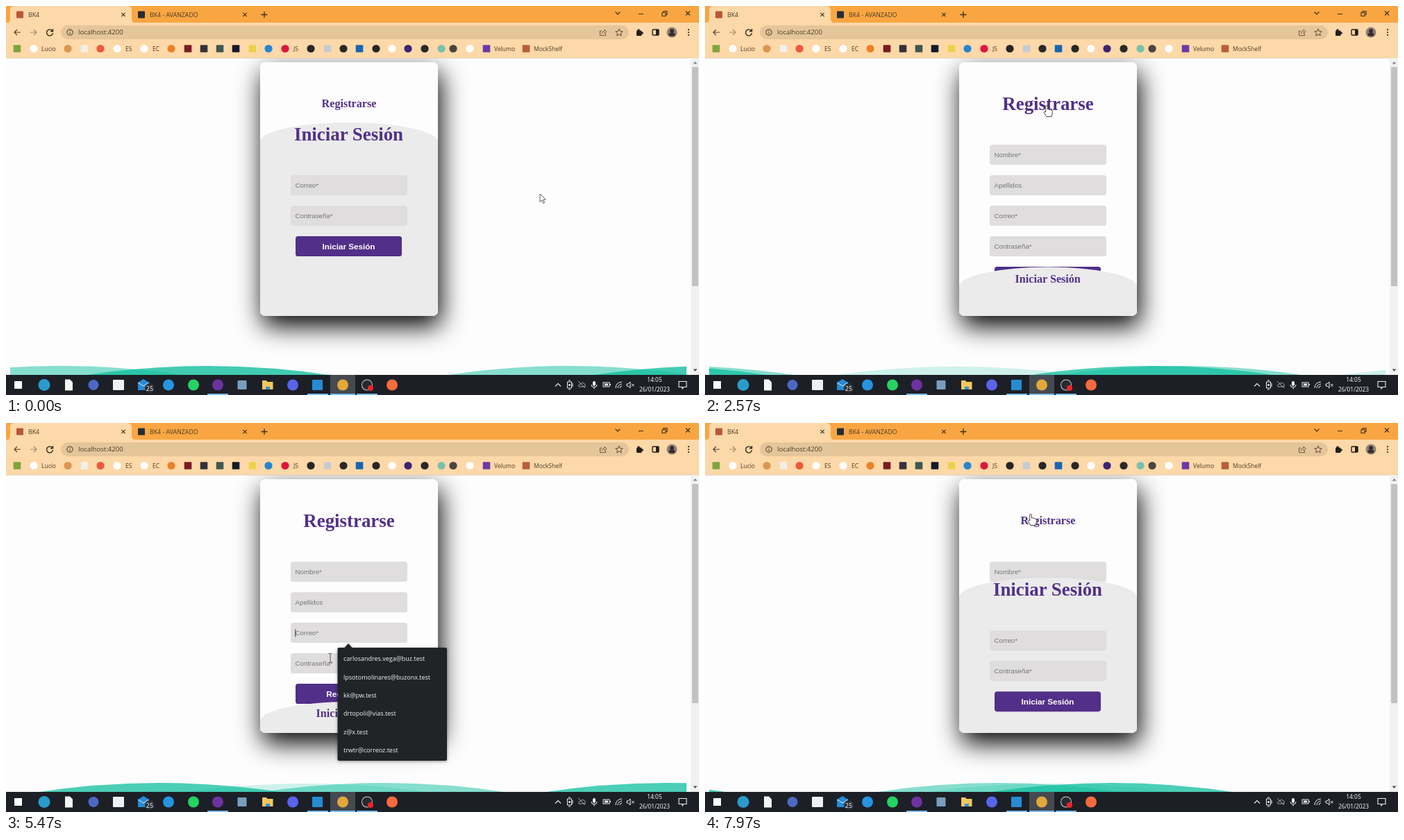
Write an HTML page that moves like this. It is 998 px wide and 561 px high and loops after 8 s.

```html
<!DOCTYPE html>
<html lang="es">
<head>
<meta charset="utf-8">
<title>Registro</title>
<style>
  html, body { margin: 0; width: 100%; height: 100%; overflow: hidden; background: #fdfdfd; }
  #stage { position: relative; width: 998px; height: 561px; overflow: hidden; }
  svg { position: absolute; left: 0; top: 0; font-family: "Open Sans", sans-serif; }
  .card { position: absolute; left: 365.5px; top: 81px; width: 256px; height: 365.5px; border-radius: 7.3px;
          background: #fefdfd; overflow: hidden; }
  .shadow { overflow: visible; box-shadow: 3.7px 14.6px 36.5px #000; }
  .login { position: absolute; left: 0; top: 87px; width: 256px; height: 336px; background: #ebebeb;
           border-radius: 50% / 8.33%; }
  .label { position: absolute; left: 0; width: 256px; height: 32px; text-align: center; color: #52308a;
           font: bold 26.9px/32px "Liberation Serif", serif; }
  .field, .button { position: absolute; box-sizing: border-box; height: 29px; border-radius: 3.6px;
                    font-family: "Liberation Sans", sans-serif; line-height: 29px; }
  .field { left: 44px; width: 168.5px; padding-left: 7px; background: #dfdddd; color: #777; font-size: 9.74px; }
  .button { left: 51.5px; width: 153px; background: #522f88; color: #fff; text-align: center;
            font-weight: bold; font-size: 11.7px; }
</style>
</head>
<body>
<div id="stage">
  <svg id="waves" width="998" height="561"></svg>
  <div class="card shadow"></div>
  <div class="card">
    <div class="label" id="signupLabel" style="top:44px">Registrarse</div>
    <div class="field" style="top:119px">Nombre*</div>
    <div class="field" style="top:163px">Apellidos</div>
    <div class="field" style="top:207px">Correo*</div>
    <div class="field" style="top:251px">Contraseña*</div>
    <div class="button" style="top:294.5px">Registrarse</div>
    <div class="login" id="login">
      <div class="label" id="loginLabel" style="top:1px">Iniciar Sesión</div>
      <div class="field" style="top:76px">Correo*</div>
      <div class="field" style="top:120px">Contraseña*</div>
      <div class="button" style="top:163.5px">Iniciar Sesión</div>
    </div>
  </div>
  <svg id="overlay" width="998" height="561"></svg>
</div>
<script>
const $ = id => document.getElementById(id);
const LOOP = 8000, OPEN = 1955, CLOSE = 7440;

// Static drawing helpers
const text = (s, x, y, size = 8.6, fill = '#4b3a28', extra = '') =>
  `<text x="${x}" y="${y}" font-size="${size}" fill="${fill}" ${extra}>${s}</text>`;
const rect = (x, y, w, h, fill, r = 0, extra = '') =>
  `<rect x="${x}" y="${y}" width="${w}" height="${h}" rx="${r}" fill="${fill}" ${extra}/>`;
const dot = (x, y, r, fill) => `<circle cx="${x}" cy="${y}" r="${r}" fill="${fill}"/>`;
const line = (d, color = '#3b2d1c', width = 1.1, fill = 'none') =>
  `<path d="${d}" fill="${fill}" stroke="${color}" stroke-width="${width}"/>`;
const cross = (x, y, r) => line(`M${x - r} ${y - r}l${2 * r} ${2 * r}m0 ${-2 * r}l${-2 * r} ${2 * r}`);

function browser() {
  let s = rect(0, 0, 998, 26, '#f9a642') + rect(0, 24, 998, 51, '#fdd8a8') + rect(0, 74.5, 998, 1, '#e3cdae');
  s += `<path d="M0 25Q6 25 6 18V6Q6 0 12 0H175Q181 0 181 6V18Q181 25 187 25Z" fill="#fdd8a8"/>`;
  s += rect(15, 7.5, 10, 10, '#b9563a', 1) + text('BK4', 32, 15.5, 8.8) + cross(169, 12.5, 2.7);
  s += rect(190, 7.5, 10, 10, '#222d38', 1) + text('BK4 - AVANZADO', 207, 15.5, 8.8) + cross(344, 12.5, 2.7);
  s += line('M367.5 12.5h9M372 8v9', '#3b2d1c', 1.3);
  s += line('M877.5 8.5l3.5 3.5 3.5-3.5M911 11.5h7M945 9.5h5v5h-5zM947 9.5v-2h5v5h-2') + cross(982, 10.5, 3);
  s += line('M21 38h-9m4-4l-4 4 4 4', '#514331', 1.2) + line('M35 38h9m-4-4l4 4-4 4', '#a28a6d', 1.2);
  s += line('M66.5 35.5A4.5 4.5 0 1 0 67.5 39M67.5 33v3.5H64', '#2f261b', 1.4);
  s += rect(79, 28, 818, 20, '#e5c59a', 10);
  s += line('M96.2 38A4.2 4.2 0 1 0 87.8 38A4.2 4.2 0 1 0 96.2 38M92 37.5v3M92 35v1.2', '#5b4a35');
  s += text('localhost:4200', 104, 41.3, 9.6, '#4a3d2d');
  s += line('M858 36h-2.500v6.500h8v-2.500M858 40q1-4 4-4v-2l3 3-3 3v-2', '#6b5842', 1);
  s += line('M883 33l1.500 3.500 3.700.3-2.800 2.400.9 3.700-3.300-2-3.300 2 .9-3.700-2.800-2.400 3.700-.3z', '#5b4a35', 1);
  s += rect(908, 35.5, 7.5, 7.5, '#221d17', 1) + dot(911, 35, 1.8, '#221d17') + dot(916, 39, 1.8, '#221d17');
  s += rect(931, 34, 9, 8, 'none', 1, 'stroke="#221d17" stroke-width="1.4"') + rect(936, 34, 4, 8, '#221d17');
  s += dot(959, 38, 7.5, '#8f8076') + dot(959, 36, 3, '#352c2b') + rect(954.5, 38.5, 9, 5, '#352c2b', 3);
  for (const y of [34.2, 38, 41.8]) s += dot(983, y, 1.1, '#2f261b');

  const circles = [[40, '#fff'], [89, '#db9650'], [136, '#ee583e'], [160, '#fff'], [199, '#fff'], [238, '#eb8128'],
    [378, '#2685d0'], [402, '#dc173f'], [439, '#262626'], [486, '#282828'], [533, '#262626'], [556, '#fff'],
    [579, '#3c2376'], [603, '#282828'], [627, '#78c1ad'], [644, '#4a4540'], [668, '#fff']];
  const squares = [[16, '#7da53d'], [113, '#f2efe9'], [262, '#791b24'], [285, '#35313c'], [308, '#3f5751'],
    [331, '#131a2b'], [355, '#ead34b'], [463, '#c7cbd3'], [509, '#1765b5'], [692, '#6c3aa7'], [749, '#b65f3c']];
  for (const [x, c] of circles) s += dot(x, 61.5, 5.6, c);
  for (const [x, c] of squares) s += rect(x - 5.3, 56.2, 10.6, 10.6, c, 1);
  for (const [label, x] of [['Lucio', 51], ['ES', 172], ['EC', 211], ['JS', 414], ['Velumo', 703], ['MockShelf', 760]])
    s += text(label, x, 64.5, 8.5);

  s += rect(986, 75, 12, 457, '#f1f1f1') + rect(988, 88, 9, 316, '#c1c1c1');
  s += `<path d="M989.500 83.500l3-3.500 3 3.500z" fill="#888"/><path d="M989.500 523.500l3 3.500 3-3.500z" fill="#555"/>`;
  return s;
}

function taskbar() {
  let s = rect(0, 532, 998, 29, '#1d1f26') + rect(467, 532, 36, 29, '#454950');
  s += rect(12, 541, 11, 11, '#fff') + dot(55, 546.5, 8.5, '#2a9bcb');
  s += `<path d="M85 538.500h7l4 4v12H85z" fill="#f6f6f6"/>`;
  s += dot(126, 546.5, 7.5, '#4c68c4') + rect(154, 539, 16, 15, '#eef1f3', 1);
  s += `<path d="M190 543l8-5 8 5v11h-16z" fill="#278bd5"/>` + line('M190 543l8 5 8-5', '#d8edfb', 1);
  s += dot(207, 551, 7, '#2b3036') + text('25', 207, 554.5, 9, '#fff', 'text-anchor="middle"');
  for (const [x, c] of [[234, '#2794df'], [270, '#25d263'], [305, '#6d32a0'], [413, '#5865ec'], [556, '#f56b3e']])
    s += dot(x, 546.5, 8, c);
  s += rect(333.5, 540, 13, 13, '#789ebd', 1);
  s += `<path d="M369 540h6l1.500 2h8v11H369z" fill="#f3c75c"/>` + rect(374, 549, 6, 4, '#3d91d0');
  s += rect(441, 539, 15, 15, '#278bd3', 1) + dot(485, 546.5, 8, '#e2a83a');
  s += dot(520, 546.5, 8, '#d4d4d6') + dot(520, 546.5, 7, '#292a30') + dot(525, 551, 4, '#ee2424');
  for (const [x, w] of [[290, 30], [434, 30], [467, 36], [505, 30]]) s += rect(x, 559, w, 2, '#76b9ed');
  const white = '#f1f1f1';
  s += line('M791 548.500l4-4 4 4', white);
  s += line('M808.500 542h6v9h-6zM816 544v5M810 540h3M810 553h3', white, 1) + dot(811.5, 546.5, 1.5, white);
  s += line('M825 549q-1-4 3-4 1-3 4-1 3 1 2 5zM824 541l10 10', '#aaa', 1);
  s += rect(845, 541, 4, 7, white, 2) + line('M843 546q0 4 4 4t4-4M847 550v2.500', white, 1);
  s += rect(860, 543, 9, 6, 'none', 0, `stroke="${white}"`) + rect(862, 544.5, 5, 3, white) + rect(869.5, 545, 1.5, 2, white);
  s += line('M878 551q0-8 9-9M881 551q0-5 6-6M884 551q0-3 3-3', white, 1);
  s += line('M894 545h2l3-3v9l-3-3h-2zM901 545l3.500 3.500m0-3.500l-3.500 3.500', white, 1);
  s += text('14:05', 934, 542.3, 8.4, '#fff', 'text-anchor="middle"');
  s += text('26/01/2023', 934, 555.5, 8.3, '#fff', 'text-anchor="middle"');
  return s + line('M969 541.500h11v8h-4l-2 2.500v-2.500h-5z', white);
}

function suggestions() {
  const mails = ['carlosandres.vega@buz.test', 'lpsotomolinares@buzonx.test', 'kk@pw.test',
    'drtopoli@vias.test', 'z@x.test', 'trwtr@correoz.test'];
  return `<g id="popup" style="filter:drop-shadow(0 1px 2px #0006)">` +
    `<path d="M487 324.500l6-6.500 6 6.500z" fill="#202427"/>` + rect(477.5, 324, 157.5, 163, '#202427', 2) +
    mails.map((m, i) => text(m, 486, 343.3 + i * 26.3, 9, '#f4f4f4')).join('') + '</g>';
}

const cursors = {
  arrow: line('M0 0V11.500l2.700-2.500 2 4.500 1.900-.9-2-4.300H8.200z', '#333', .8, '#fff'),
  hand: line('M-1.300 9V1.200Q0-.8 1.300 1.200V6Q3 5 4 6.500 5.500 5.700 6.300 7.200 8.300 6.700 8.300 9V12L7 16.500H0L-4 10.500Q-3.700 8.200-1.300 10z',
    '#333', .9, '#fff'),
  beam: line('M-2.500-6.500H-.7L0-5.800.7-6.500H2.500M0-5.800V5.800M-2.500 6.500H-.7L0 5.800.7 6.500H2.500', '#555', 1)
};

$('overlay').innerHTML = '<path id="caret" stroke="#222" stroke-width=".9"/>' + suggestions() + browser() + taskbar() +
  '<g id="cursor">' + Object.entries(cursors).map(([k, d]) => `<g id="${k}">${d}</g>`).join('') + '</g>';

// start position, px per second, opacity, crest height
const waveLayers = [[300, 24.3, .2, 520], [810, -48.7, .5, 519], [290, -146, .75, 519]];
const WAVE = 730;
$('waves').innerHTML = '<clipPath id="strip"><rect x="6" y="510" width="974" height="24"/></clipPath><g clip-path="url(#strip)">' +
  waveLayers.map(([, , o], i) => `<path id="wave${i}" fill="#10bf9f" opacity="${o}"/>`).join('') + '</g>';

// Cursor stops: time, x, y
const stops = [[0, 769, 271], [300, 769, 271], [1500, 480, 148], [1630, 480, 148], [2570, 492, 143], [2950, 496, 217],
  [4170, 496, 221], [4400, 496, 221], [5100, 482, 301], [5250, 480, 303], [5470, 467, 339], [5900, 462, 347],
  [6300, 462, 347], [7100, 469, 131], [8000, 469, 131]];
// Field focus: from, to, centre
const focuses = [[3000, 5200, 215], [5200, 6100, 303], [6100, CLOSE, 347]];

const clamp = v => Math.min(1, Math.max(0, v));
const smooth = v => v * v * (3 - 2 * v);

// cubic-bezier(.42, 0, .58, 1)
function easeInOut(x) {
  x = clamp(x);
  let lo = 0, hi = 1;
  for (let i = 0; i < 20; i++) {
    const s = (lo + hi) / 2;
    if (1.26 * s * (1 - s) ** 2 + 1.74 * s * s * (1 - s) + s ** 3 < x) lo = s; else hi = s;
  }
  return smooth(lo);
}
const toggle = (t, duration) => easeInOut((t - OPEN) / duration) - easeInOut((t - CLOSE) / duration);

function cursorAt(t) {
  const i = stops.findIndex(s => s[0] > t);
  const [t0, x0, y0] = stops[i - 1], [t1, x1, y1] = stops[i];
  const k = smooth((t - t0) / (t1 - t0));
  return [x0 + (x1 - x0) * k, y0 + (y1 - y0) * k];
}

function cursorKind(x, y) {
  if (x > 366 && x < 621 && y > 125 && y < 160) return 'hand';
  const row = (y - 200) % 44;
  return x > 409 && x < 578 && y > 200 && y < 361 && row < 29 ? 'beam' : 'arrow';
}

function draw(t) {
  waveLayers.forEach(([start, speed, , top], i) => {
    const first = ((start + speed * t / 1000) % WAVE + WAVE) % WAVE - WAVE;
    let d = '';
    for (let x = first; x < 1200; x += WAVE) d += `M${x - 180} 533Q${x} ${2 * top - 533} ${x + 180} 533Z`;
    $('wave' + i).setAttribute('d', d);
  });

  const label = toggle(t, 500);
  $('login').style.transform = `translateY(${234 * toggle(t, 800)}px)`;
  $('signupLabel').style.transform = `scale(${.6 + .4 * label})`;
  $('loginLabel').style.transform = `scale(${1 - .4 * label})`;

  const focus = focuses.find(([from, to]) => t >= from && t < to);
  const caretOn = focus && (t - focus[0]) % 1000 < 500;
  $('caret').setAttribute('d', caretOn ? `M416.8 ${focus[2] - 5.5}v11` : '');
  $('popup').style.display = focus === focuses[1] ? '' : 'none';

  const [x, y] = cursorAt(t), kind = cursorKind(x, y);
  $('cursor').setAttribute('transform', `translate(${x} ${y})`);
  for (const k in cursors) $(k).style.display = k === kind ? '' : 'none';
}

const begin = performance.now();
function tick() {
  draw((performance.now() - begin) % LOOP);
  requestAnimationFrame(tick);
}
tick();
</script>
</body>
</html>
```
